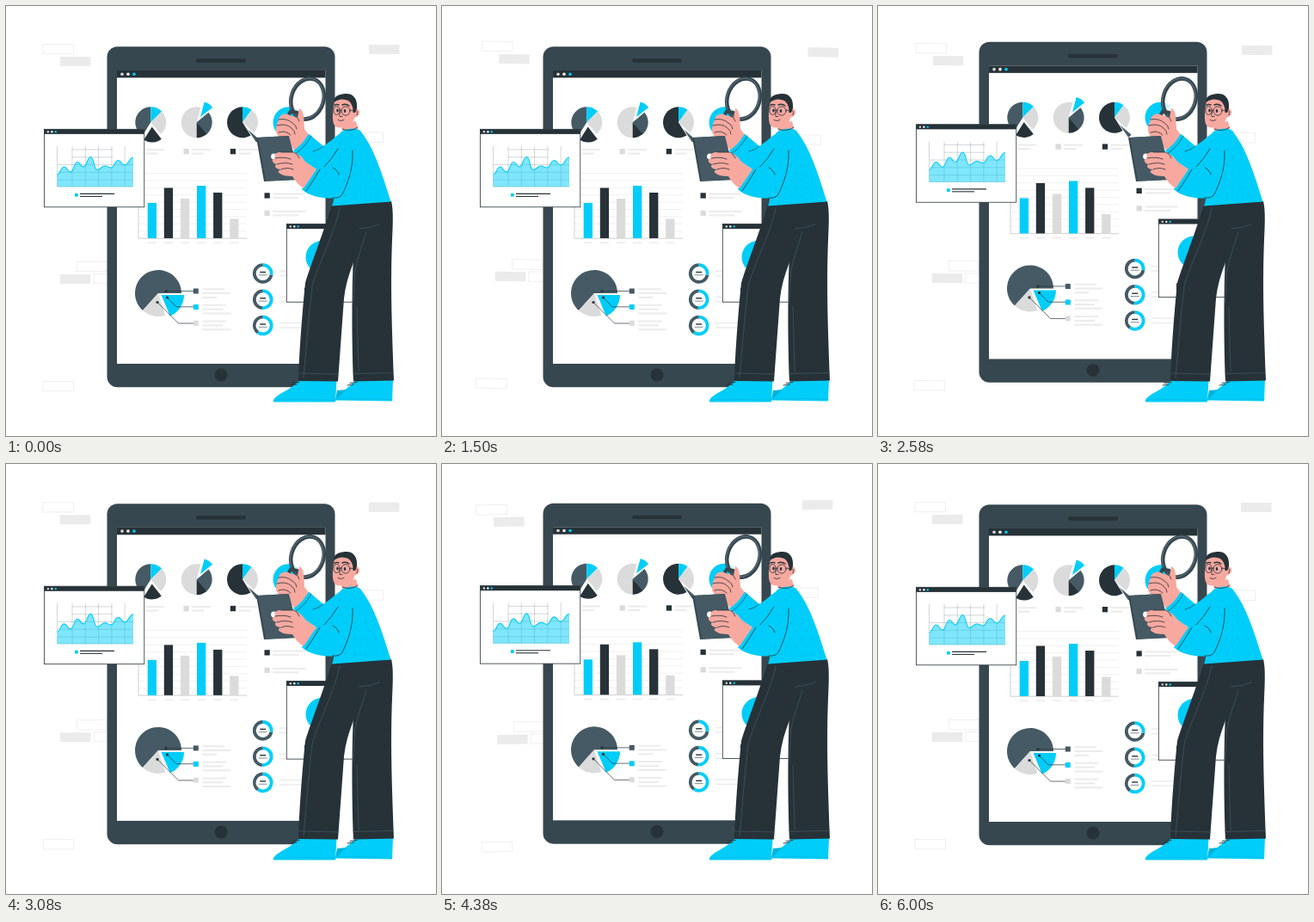
Animation of 500 by 500 pixels, one loop 6040 ms. Source, as an HTML page:

```html
<!DOCTYPE html>
<html lang="en">
<head>
<meta charset="utf-8">
<title>Tablet analytics</title>
<style>
  html, body { margin: 0; width: 100%; height: 100%; overflow: hidden; background: #fff; }
  svg { display: block; width: 100vw; height: 100vh; }
</style>
</head>
<body>
<svg viewBox="0 0 500 500">
  <g id="cards"></g>
  <g id="board"></g>

  <g id="man" stroke-linecap="round" stroke-linejoin="round">
    <!-- shoes -->
    <g fill="#00cdf9">
      <path d="M408 434L450 434L449 459.5L383 458.5C385 451 397 446 408 434Z"/>
      <path d="M341 435L384.500 435L383 460.500L311 460.500C310 452 329 449 341 435Z"/>
    </g>
    <path d="M311.500 458.300Q345 456.500 383 458.500M384 457Q415 456 449 457.500" fill="none" stroke="#00b4dc" stroke-width=".6"/>
    <path d="M383 458L385 447L396 446Z" fill="#00b4dc"/>
    <path d="M333 438.500L341 437.500M331 441L338 440M400 438.500L408 437.500M397 441L404 440" stroke="#263238" stroke-width=".9"/>

    <!-- trousers -->
    <path d="M405 262L448 227Q450.500 236 449.500 260C447 315 448 355 451 435.500L404 436.500C402 390 402 330 404 290Z" fill="#263238"/>
    <path d="M379 231L448 227L444 253L419 262C410 285 396 311 393 340L386 436.500L340 436C341 400 345 350 348 322C354 302 371 258 379 231Z" fill="#263238"/>
    <g fill="none" stroke="#455a64" stroke-width=".7">
      <path d="M388 235C383 262 361 305 356 326C352 360 349 398 346 432M434 254Q424 258 411 259M419 263C413 282 408 296 405.500 310L403.500 345"/>
      <path d="M341 427L386 428M404 427.500L450 426.500M408 350L410 425"/>
    </g>

    <!-- far arm and magnifier -->
    <g transform="rotate(18 350.500 108)">
      <ellipse cx="350.500" cy="108" rx="18.500" ry="24" fill="#fff" fill-opacity=".8"/>
      <ellipse cx="350.500" cy="108" rx="18.700" ry="24" fill="none" stroke="#37474f" stroke-width="4.600"/>
      <ellipse cx="349.500" cy="108" rx="18.700" ry="24" fill="none" stroke="#78909c" stroke-width=".6"/>
    </g>
    <path d="M339 124L331 122.500L329 126L327 158" fill="none" stroke="#37474f" stroke-width="4"/>
    <path d="M353 151L336 169L330 160C320 155 313 150 314 143C314 138 316 135 317 132C318 126 325 124 330 127L339 130L341 119Q345 120 346 128L347 143Z" fill="#f7a9a0"/>
    <path d="M317 132Q326 130 333 136Q338 139 338 143M315 139Q326 136 332 142Q336 145 336 149M317 147Q325 144 331 150M339 130L341 134" fill="none" stroke="#263238" stroke-width=".8"/>
    <path d="M392 146C383 151 376 159 369 163L352 148.500C347 157 341 164 334 168C342 177 352 185 360 189L386 196Z" fill="#00cdf9"/>
    <path d="M355 151C350 160 344 167 337 171M369 163Q363 168 357 169" fill="none" stroke="#263238" stroke-width=".6"/>

    <!-- clipboard -->
    <path d="M291 153L328 151L341 202L300 204Z" fill="#37474f"/>
    <path d="M293 153L329 151L342 201.500L302 203.500Z" fill="#455a64"/>
    <circle cx="311.500" cy="175" r="3.400" fill="#fff"/>

    <!-- neck and sweater -->
    <path d="M390 136L407 134L410 146Q399 152 391 145Z" fill="#f7a9a0"/>
    <path d="M389 147C395 142 407 141 412 145C428 165 437 194 447.500 227.500L379 232.500Q382 225 381 218C377 196 380 170 389 147Z" fill="#00cdf9"/>
    <path d="M391 143Q401 147 409 141" fill="none" stroke="#263238" stroke-width=".8"/>
    <path d="M385 162C379 171 370 182 361 188L344 213C352 222 374 225 387 223C400 214 405 187 404 169Q396 158 385 162Z" fill="#00cdf9"/>
    <path d="M403 168C404 188 398 205 391 219Q388 224 380 223M365 190Q357 204 349 215M386 166Q379 178 370 187M387 196Q385 190 380 188" fill="none" stroke="#263238" stroke-width=".8"/>
    <g id="dots" fill="#00b4dc"></g>

    <!-- near hand -->
    <path d="M361 190L346 212Q338 207 333 198Q322 198 319 195C315 193 317 191 320 190C313 190 311 185 315 184C309 183 308 178 313 177C311 172 314 170 320 170L335 170Q344 174 348 181Z" fill="#f7a9a0"/>
    <path d="M313 177Q324 175 331 178M315 184Q325 181 333 184M320 190Q327 187 334 190M320 170L335 170Q340 173 341 177" fill="none" stroke="#263238" stroke-width=".8"/>

    <!-- head -->
    <path d="M382 111C380 120 379 130 381 137Q384 143 392 141C400 140 405 134 406 128L407 112L396 105Z" fill="#f7a9a0"/>
    <path d="M405 122C407 117 412 120 411 125Q409 130 404 129Z" fill="#f7a9a0"/>
    <path d="M381.500 112C380 104 390 102 396 102C404 102 409 108 408 119L406 124L403.500 124C404 118 402 113 398 110Q389 106 381.500 112Z" fill="#263238"/>
    <g fill="none" stroke="#263238" stroke-width=".8">
      <ellipse cx="395" cy="122" rx="5" ry="5.200"/>
      <ellipse cx="384.500" cy="121.500" rx="3.700" ry="5"/>
      <path d="M388 121L390 121M400 121L406 122M408 122Q409.500 124 408 127M389 122Q387 127 388 128.500L391 128.500M386 132.500Q389 135 393 132.500"/>
      <path d="M391 115Q395 113 399 116M382 115.500Q384 113.500 387 115" stroke-width="1.400"/>
    </g>
    <g fill="#263238">
      <ellipse cx="394" cy="122" rx="1.300" ry="1.900"/>
      <ellipse cx="385.500" cy="121.500" rx="1.200" ry="1.900"/>
    </g>
  </g>
</svg>

<script>
const CYAN = '#00cdf9', DARK = '#263238', CASE = '#37474f', SLATE = '#455a64',
      GRAY = '#dbdbdb', PALE = '#ebebeb', WHITE = '#fff';

const byId = id => document.getElementById(id);
const box = (x, y, w, h, fill, more = '') =>
  `<rect x="${x}" y="${y}" width="${w}" height="${h}" fill="${fill}" ${more}/>`;
const disc = (x, y, r, fill) => `<circle cx="${x}" cy="${y}" r="${r}" fill="${fill}"/>`;
const path = (d, stroke, width, more = '') =>
  `<path d="${d}" fill="none" stroke="${stroke}" stroke-width="${width}" ${more}/>`;
const rule = (x1, x2, y, color = PALE, width = 2) => path(`M${x1} ${y}H${x2}`, color, width);

// Angles run clockwise in degrees from twelve o'clock.
function arc(x, y, r, from, to) {
  const at = a => {
    const rad = a * Math.PI / 180;
    return `${(x + r * Math.sin(rad)).toFixed(2)} ${(y - r * Math.cos(rad)).toFixed(2)}`;
  };
  return `${at(from)}A${r} ${r} 0 ${to - from > 180 ? 1 : 0} 1 ${at(to)}`;
}
const slice = (x, y, r, from, to, fill) =>
  `<path d="M${x} ${y}L${arc(x, y, r, from, to)}Z" fill="${fill}"/>`;

function drawCards() {
  const open = [[43, 44.5], [403, 147], [82.5, 297.5], [102, 311.5], [43, 436.5]];
  const solid = [[63, 59], [422, 45], [63, 312]];
  return open.map(([x, y]) => box(x, y, 35.5, 11.3, WHITE, `stroke="#e4e4e4" stroke-width=".6"`)).join('') +
    solid.map(([x, y]) => box(x, y, 35.5, 11, PALE)).join('');
}

function drawTablet() {
  return box(117.5, 47.3, 265, 396, CASE, 'rx="12"') +
    box(221, 61.3, 58, 4.4, DARK, 'rx="2.2"') +
    disc(250, 429, 7.5, DARK) +
    box(129, 75, 242.5, 341, WHITE) +
    box(129, 75, 242.5, 8.4, DARK) +
    disc(135, 79.2, 1.8, GRAY) + disc(142, 79.2, 1.8, WHITE) + disc(149, 79.2, 1.8, CYAN);
}

function drawSmallPies() {
  const r = 18, y = 135.3;
  return slice(168.3, y, r, 212, 360, SLATE) + slice(168.3, y, r, 0, 45, CYAN) +
    slice(168.3, y, r, 45, 140, GRAY) + slice(169.7, 140.5, r, 142, 212, DARK) +
    slice(221.7, y, r, 180, 375, GRAY) + slice(221.7, y, r, 50, 145, SLATE) +
    slice(221.7, y, r, 140, 180, DARK) + slice(226, 129, r, 15, 52, CYAN) +
    slice(275, y, r, 148, 360, DARK) + slice(275, y, r, 0, 36, CYAN) +
    slice(275, y, r, 36, 132, GRAY) + slice(281, 143.5, r, 131, 146, SLATE) +
    slice(328.5, y, r, 180, 400, CYAN) + slice(328.5, y, r, 40, 180, GRAY);
}

function drawKeys() {
  const keys = [[153, 166, SLATE, 21, 14], [206.5, 166, GRAY, 22, 14], [260.8, 166, DARK, 22, 14],
                [300.5, 217.3, DARK, 38, 30], [300.5, 237.8, GRAY, 38, 30]];
  return keys.map(([x, y, color, a, b]) =>
    box(x, y, 6.3, 6.3, color) + rule(x + 9.8, x + 9.8 + a, y + 1.2) + rule(x + 9.8, x + 9.8 + b, y + 5.6)).join('');
}

function drawBars() {
  const tops = [229, 211.5, 224, 209, 217, 247.5], colors = [CYAN, DARK, GRAY];
  let out = '';
  for (let i = 0; i < 9; i++) out += rule(154, 280, 194.5 + i * 8.4, PALE, .7);
  out += path('M154 190V270.200H280', '#c4c4c4', .8);
  tops.forEach((top, i) => {
    const x = 164.7 + i * 19.1;
    out += box(x, top, 10.3, 270 - top, colors[i % 3]) + rule(x, x + 10.3, 275.2, PALE, 1.5);
  });
  return out;
}

function drawBigPie() {
  const groups = [[331.5, SLATE, [26, 33, 17]], [350, CYAN, [28, 24, 33]], [368.8, GRAY, [28, 24, 33]]];
  const x = 177, y = 334, r = 27;
  let out = slice(x, y, r, 222, 450, SLATE) + slice(x, y, r, 162, 222, GRAY) +
    slice(180.5, 336, 26.5, 90, 157, CYAN) +
    path('M186 331.500H218M187.500 339L198 349.800H218M176 344.500L200.500 369H218', DARK, .7) +
    disc(186, 331.5, 1.6, DARK) + disc(187.5, 339, 1.6, DARK) + disc(176, 344.5, 1.6, DARK);
  for (const [cy, color, widths] of groups) {
    out += box(217.8, cy - 3, 6, 6, color);
    widths.forEach((w, i) => out += rule(228.3, 228.3 + w, cy - 2.2 + i * 4.8));
  }
  return out;
}

function drawRings() {
  return [[311, 100], [341.3, 185], [371.5, 215]].map(([y, share]) =>
    path('M' + arc(298.7, y, 9.9, share, 360), SLATE, 3.8) +
    path('M' + arc(298.7, y, 9.9, 0, share), CYAN, 3.8) +
    rule(295.2, 302.2, y - 1.5, DARK, 1.4) + rule(293.8, 303.6, y + 1.8, SLATE, .7) +
    rule(318, 345, y - 2.8, PALE, 1.4) + rule(318, 345, y + 2.6, PALE, 1.4)).join('');
}

function drawWindow(x, y, w, h) {
  return box(x, y, w, h, WHITE, `stroke="${DARK}" stroke-width=".8"`) + box(x, y, w, 5.6, DARK) +
    disc(x + 4.5, y + 2.9, 1.2, GRAY) + disc(x + 9, y + 2.9, 1.2, WHITE) + disc(x + 13.4, y + 2.9, 1.2, CYAN);
}

// Smooth line through points, using level handles at each point.
function smooth(points) {
  return points.slice(1).reduce((d, [x, y], i) => {
    const [px, py] = points[i], mid = (px + x) / 2;
    return `${d}C${mid} ${py} ${mid} ${y} ${x} ${y}`;
  }, `${points[0]}`);
}

function drawAreaWindow() {
  const wave = smooth([[59.5, 196], [67.5, 187], [75, 193], [83, 181.5], [90, 187], [98.5, 175.5],
                       [106, 190.5], [115, 186], [122, 188], [130.5, 179.5], [138, 185], [148, 176]]);
  let grid = 'M59.500 163V210H148';
  for (let i = 0; i < 5; i++) grid += `M${77 + i * 15.3} 163V210`;
  for (let i = 0; i < 5; i++) grid += `M${i < 2 ? 77 : 60} ${167 + i * 8.8}H${i < 2 ? 124 : 148}`;
  return drawWindow(44.4, 143.3, 116.4, 90.5) +
    path(grid, SLATE, .45, 'opacity=".55"') +
    `<path d="M${wave}V210.300H59.500Z" fill="${CYAN}" opacity=".5"/>` + path('M' + wave, CYAN, 1.1) +
    box(80, 217.8, 3.8, 3.8, CYAN) + rule(86, 126, 218.4, DARK, 1.2) + rule(86, 112, 221.4, DARK, 1.1);
}

function drawPieWindow() {
  return drawWindow(326.3, 253.5, 112, 90.7) + disc(367.5, 292, 19, CYAN) + box(347, 328, 3, 14, DARK);
}

function drawDots() {
  let out = '';
  for (let row = 0; row < 8; row++) {
    const y = 158 + row * 9;
    for (let x = 388 + row % 2 * 6; x < 412 + row * 4; x += 12) out += disc(x, y, .8, '#00b4dc');
  }
  for (let i = 0; i < 4; i++) out += disc(358 + i * 7, 212 - i * 9, .8, '#00b4dc');
  return out;
}

byId('cards').innerHTML = drawCards();
byId('board').innerHTML = drawTablet() + drawSmallPies() + drawKeys() + drawBars() +
  drawBigPie() + drawRings() + drawPieWindow() + drawAreaWindow();
byId('dots').innerHTML = drawDots();

const LOOP = 6040, STEP = 1000 / 24, BOB = 1500, SWAY = 6000;
// Triangle wave: 0 at the ends of a period, 1 in its middle.
const triangle = p => 1 - Math.abs(1 - 2 * (p - Math.floor(p)));

function draw(now) {
  const t = Math.floor((now % LOOP + 9) / STEP) * STEP;
  const lift = -10 * triangle(t / BOB);
  const tilt = 2 * triangle(t / SWAY + .25) - 1;
  byId('board').setAttribute('transform', `translate(0 ${lift.toFixed(3)})`);
  byId('cards').setAttribute('transform', `rotate(${tilt.toFixed(4)} 250 247)`);
}

const start = performance.now();
function tick() {
  draw(performance.now() - start);
  requestAnimationFrame(tick);
}
tick();
</script>
</body>
</html>
```
